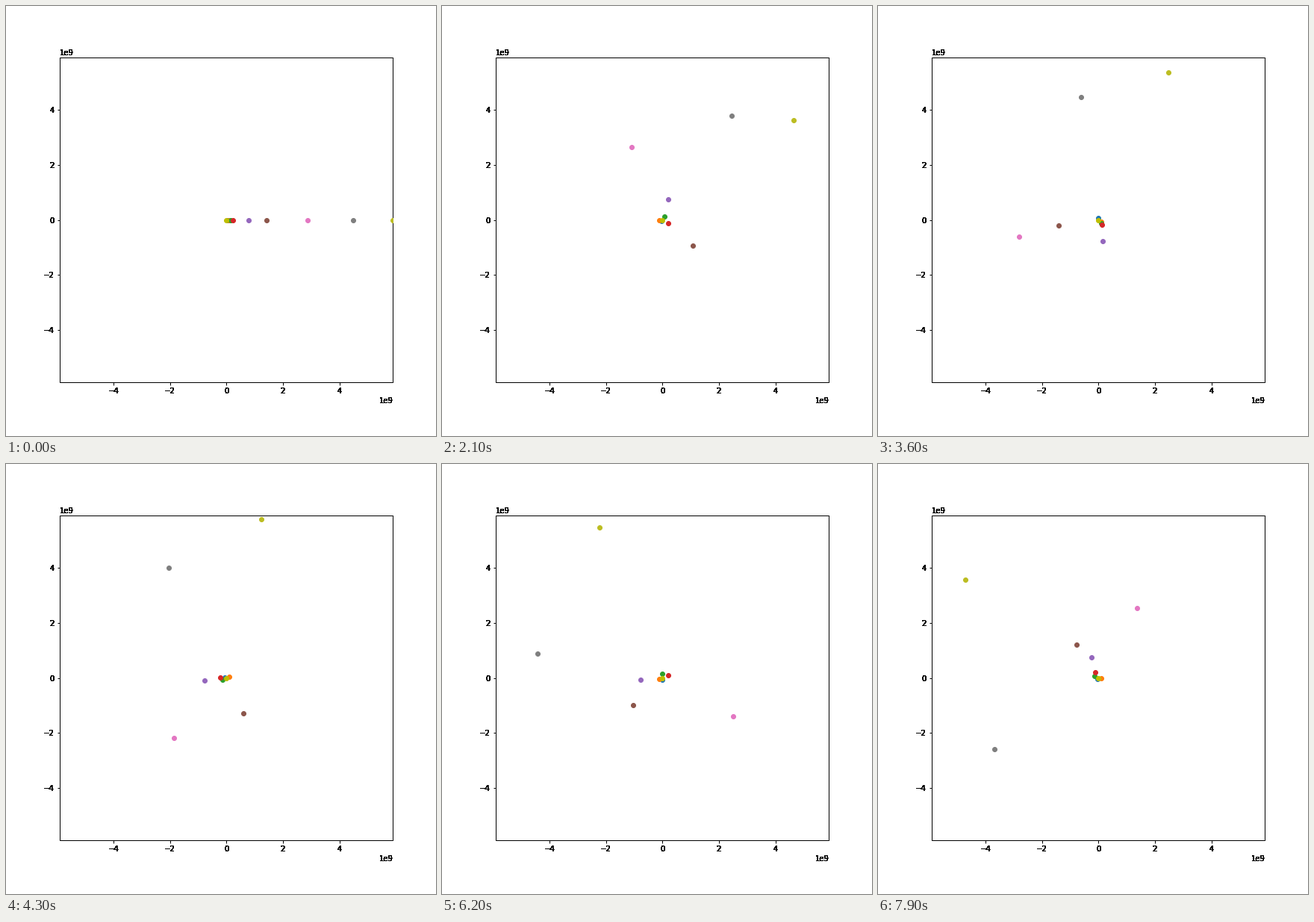
A matplotlib script for the animation above (8 s loop, 576 px wide and 576 px high).

```python
import numpy as np
import matplotlib.pyplot as plt
from matplotlib.animation import FuncAnimation
from matplotlib.axes import Axes

FRAMES = 80
LIMIT = 5.9e9
STEP = 90560 / 199  # days per frame

# orbit radius in km, period in days
ORBITS = np.array([
    (57.9e6, 87.969),
    (108.2e6, 224.701),
    (149.6e6, 365.256),
    (227.9e6, 686.98),
    (778.5e6, 4332.59),
    (1.43e9, 10759.22),
    (2.87e9, 30688.5),
    (4.5e9, 60182),
    (5.9e9, 90560),
])
RADIUS, PERIOD = ORBITS.T


class InkedAxes(Axes):
    """Axes whose labels are overprinted until their soft edges turn solid."""

    passes = 16

    def draw(self, renderer):
        super().draw(renderer)
        for axis in (self.xaxis, self.yaxis):
            labels = [*axis.get_ticklabels(), axis.get_offset_text()]
            for _ in range(self.passes):
                for label in labels:
                    label.draw(renderer)


plt.rcParams.update({
    "font.family": "DejaVu Sans",
    "font.size": 10,
    "axes.linewidth": 1,
    "xtick.major.width": 1,
    "ytick.major.width": 1,
})

fig = plt.figure(figsize=(8, 8), dpi=72, facecolor="white")
ax = fig.add_axes(InkedAxes(fig, [0.125, 0.125, 0.775, 0.755]))
ticks = np.arange(-4, 5, 2) * 1e9
ax.set(xticks=ticks, yticks=ticks, xlim=(-LIMIT, LIMIT), ylim=(-LIMIT, LIMIT))

planets = [ax.plot([r], [0], "o", color=f"C{i}", zorder=5)[0]
           for i, r in enumerate(RADIUS)]
ax.plot([0], [0], "o", color="y", zorder=5)


def update(frame):
    angle = 2 * np.pi * frame * STEP / PERIOD
    for dot, x, y in zip(planets, RADIUS * np.cos(angle), RADIUS * np.sin(angle)):
        dot.set_data([x], [y])
    return planets


anim = FuncAnimation(fig, update, frames=FRAMES, interval=100,
                     repeat=True, repeat_delay=0, blit=False)
plt.show()
```
